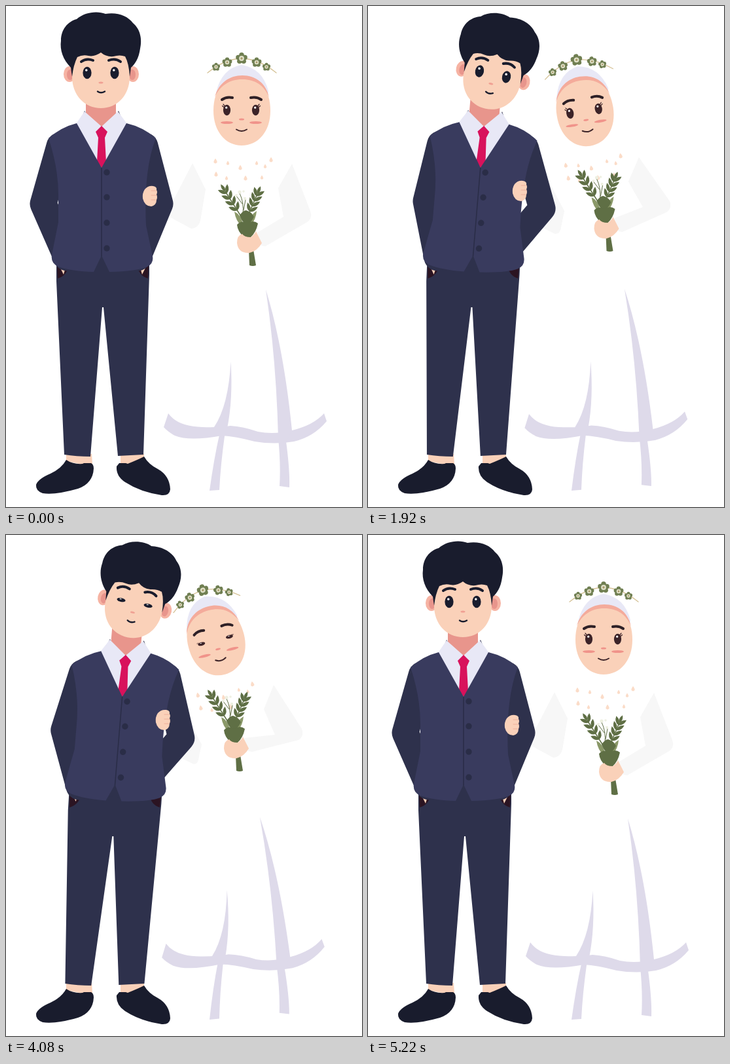
Recreate the animation shown at these times as an HTML page. Size 544 px wide and 765 px high, loop 5400 ms.

```html
<!DOCTYPE html>
<html lang="en">
<head>
<meta charset="utf-8">
<title>Wedding couple</title>
<style>
  html, body { margin: 0; width: 100%; height: 100%; overflow: hidden; background: #fff; }
  svg { display: block; width: 544px; height: 765px; }
  .ink { fill: #191c2d; }
  .suit { fill: #2e314c; }
  .vest { fill: #393b5e; }
  .skin { fill: #fad1b9; }
  .lilac { fill: #e8e8f6; }
  .fold { fill: #dedaea; }
  .sleeve { fill: #f7f7f7; }
  .rose { fill: #e8958c; }
  .green { fill: #5f6f45; }
  .sage { fill: #8a9868; }
  .line { fill: none; stroke-linecap: round; }
  .arm { fill: none; stroke: #2e314c; stroke-width: 41; stroke-linejoin: round; stroke-linecap: round; }
</style>
</head>
<body>
<svg viewBox="0 0 544 765">
  <defs>
    <path id="leaf" class="green" d="M0 0Q6 -7 0 -16Q-6 -7 0 0Z"/>
    <path id="drop" fill="#fbdcc8" d="M0 -4Q3 0 2.4 2Q0 4.5 -2.4 2Q-3 0 0 -4Z"/>
    <g id="flower">
      <g id="petals" fill="#707f52">
        <circle cy="-5" r="3.6"/><circle cx="4.8" cy="-1.5" r="3.6"/><circle cx="3" cy="4" r="3.6"/>
        <circle cx="-3" cy="4" r="3.6"/><circle cx="-4.8" cy="-1.5" r="3.6"/>
      </g>
      <circle r="3.7" fill="#dfe0c8"/><circle r="1.6" fill="#a99a6a"/>
    </g>
    <g id="groomEye">
      <ellipse class="ink" rx="6.6" ry="9.2"/><circle cx="-1.2" cy="-4" r="1.8" fill="#fff"/>
    </g>
    <g id="brideEye">
      <ellipse rx="5.6" ry="8.2" fill="#3c2328"/><circle cx="-.8" cy="-3.8" r="1.6" fill="#fff"/>
    </g>
    <path id="lash" class="line" stroke="#3c2328" stroke-width="1.2" d="M-4 -4L-7 -6.5M-3 -6L-5.5 -9"/>
  </defs>

  <g id="dress" class="fold">
    <path d="M248 622Q262 642 300 643Q325 644 343 641Q362 642 385 650Q410 655 437 648Q470 640 486 622L490 634Q470 658 440 665Q410 670 380 665Q350 657 330 656Q280 665 258 656Q247 650 241 643Z"/>
    <path d="M397 433Q424 520 437 648L428 665Q434 710 433 735L418 733Q420 700 416 660Q413 540 397 433Z"/>
    <path d="M343.500 543Q347 600 338 645L334 657Q328 700 326 739L311 740Q318 690 326 655L318 643Q340 610 343.500 543Z"/>
  </g>
  <path id="sleeveL" class="sleeve"/>
  <path id="sleeveR" class="sleeve"/>
  <g id="beads"></g>

  <g id="bouquet">
    <g id="sprigs">
      <path class="line" stroke="#5f6f45" stroke-width="1" d="M362 318Q364 300 357 286M363 312L366 296M361 302L352 290"/>
      <g fill="#eef0e2"><circle cx="357" cy="284" r="2.600"/><circle cx="365" cy="294" r="2.200"/><circle cx="352" cy="289" r="2"/><circle cx="363" cy="283" r="1.800"/></g>
    </g>
    <path class="green" d="M371 372L378 372L382 396Q377 398 372 396Z"/>
    <path class="sage" d="M349 314Q358 318 362 332L360 336Q351 328 349 314ZM383 313Q382 326 374 335L369 332Q373 319 383 313Z"/>
    <path class="green" d="M357 320Q362 312 367 312Q375 314 379 322Q374 332 367 334Q360 329 357 320Z"/>
    <path class="green" d="M353 334Q360 326 368 332Q378 326 385 332Q382 346 374 353L364 353Q354 345 353 334Z"/>
    <path class="skin" d="M353 362Q353 350 361 348Q364 353 374 353Q379 350 382 344Q387 354 391 362Q384 374 372 377Q355 378 353 362Z"/>
  </g>

  <g id="brideHead">
    <path class="lilac" d="M321 132Q330 95 360 90Q392 95 401 130L398 145L322 145Z"/>
    <path class="skin" d="M317 160C317 126 335 107 361 107C388 107 404 128 404 160C404 192 385 213 360 213C336 213 317 192 317 160Z"/>
    <path fill="#f4ab9b" d="M319 139C325 117 342 106 361 106C382 106 397 118 402 139C394 121 381 112 361 112C341 112 327 122 319 139Z"/>
    <path class="line" stroke="#d5c296" stroke-width="1.300" d="M308 102Q334 81 360 80Q387 81 413 102"/>
    <g id="crown"></g>
    <g class="line" stroke="#2e2026" stroke-width="4"><path d="M330 143Q337 138 346 140M374 140Q383 138 390 143"/></g>
    <g id="brideEyes"></g>
    <g fill="#f0938a"><ellipse cx="337.500" cy="178" rx="9.500" ry="2"/><ellipse cx="381.500" cy="178" rx="9.500" ry="2"/><ellipse cx="360" cy="173" rx="4" ry="1.500"/></g>
    <path class="line" stroke="#3c2328" stroke-width="2" d="M352 188.500Q360 193.500 368 188.500"/>
  </g>

  <path class="skin" d="M92 684H131L132 700H117L92 695ZM175 684H211V691L186 700H175Z"/>
  <path class="ink" d="M92 693Q102 700 117 699L119 698H130Q134 700 134 706Q133 729 110 737Q75 747 56 744Q45 740 46 731Q49 722 68 714Q85 706 92 693Z"/>
  <path class="ink" d="M169 703L173 698H183L186 699Q201 693 211 688Q218 700 232 707Q250 717 251 738Q250 748 238 747Q205 742 182 727Q168 718 169 703Z"/>
  <g id="legs">
    <path class="suit" d="M77 385H219V410L210 685L171 687L149 460H147L129 688Q108 688 89 685L77 420Z"/>
    <path fill="#2b1422" d="M78 396H96Q93 412 79 416ZM218 396H200Q203 412 217 416Z"/>
    <path id="handL" class="skin" d="M79 392H93L88 410Z"/>
    <path id="handR" class="skin" d="M217 392H203L208 410Z"/>
  </g>
  <path id="armL" class="arm"/>
  <path id="armR" class="arm"/>
  <g id="torso">
    <path class="suit" d="M120 160L128 172L112 180ZM172 160L164 172L180 180ZM134 400L146 375L158 400Z"/>
    <path class="rose" d="M122 144H168V166L146 186L122 166Z"/>
    <path class="lilac" d="M120 161L107 180L146 248L185 180L171 161L146 184Z"/>
    <path fill="#d8125c" d="M146 183L155 192L151 201L153 238L146 247L139 238L141 201L137 192Z"/>
    <path class="vest" d="M108 179Q84 185 65 202Q81 250 80 295V330L70 380Q68 393 80 398Q100 405 134 406L146 381L158 406Q200 405 216 398Q226 393 224 382L214 335Q210 250 229 202Q210 185 184 179L146 247Z"/>
    <path class="line" stroke="#2a2d47" stroke-width="1.500" d="M146 247V382"/>
    <g fill="#2a2d47"><circle cx="154" cy="254" r="4.700"/><circle cx="154" cy="292" r="4.700"/><circle cx="154" cy="331" r="4.700"/><circle cx="154" cy="370" r="4.700"/></g>
  </g>
  <g id="groomHead">
    <g fill="#f6b3a3"><ellipse cx="97" cy="104" rx="9" ry="12"/><ellipse cx="194" cy="104" rx="9" ry="12"/></g>
    <g class="rose"><ellipse cx="98" cy="105" rx="5" ry="8"/><ellipse cx="193" cy="105" rx="5" ry="8"/></g>
    <path class="skin" d="M101 70V108C101 136 120 156 145 156C170 156 189 136 189 108V70Z"/>
    <path class="ink" d="M101 108L99 94C87 82 82 67 84 53C84 36 94 24 108 20C120 9 140 7 152 12C170 9 186 15 194 26C206 36 208 52 205 65C203 80 197 89 191 94L189 108Q188 88 182 77Q174 74 164 77Q153 78 145 71Q135 78 126 76Q117 74 109 78Q103 90 101 108Z"/>
    <path class="line" stroke="#191c2d" stroke-width="4" d="M115 85Q123 79 133 83M157 83Q167 79 175 85"/>
    <g id="groomEyes"></g>
    <ellipse cx="145" cy="117" rx="3.500" ry="1.500" fill="#f0a093"/>
    <path class="line" stroke="#191c2d" stroke-width="2.400" d="M140 130.500Q145 134 151 130.500"/>
  </g>
  <g id="holdHand">
    <path class="skin" d="M212 280Q217 274 225 275Q231 276 230 281Q232 284 230 288Q232 292 230 296Q230 304 222 306Q212 306 209 294Q208 286 212 280Z"/>
    <path class="line" stroke="#eeb09c" stroke-width="1" d="M222 282H229M222 289H230M222 296H229"/>
  </g>
</svg>
<script>
const LOOP = 5400, STEP = 30;
const $ = id => document.getElementById(id);
const use = (id, x, y, more = '') => `<use href="#${id}" transform="translate(${x} ${y}) ${more}"/>`;

// Static details built from rules
$('crown').innerHTML = [[321, 93, .72], [338, 86, .88], [360, 80, 1.05], [383, 86, .88], [398, 93, .72]]
  .map(([x, y, s]) => use('flower', x, y, `scale(${s})`)).join('');
$('beads').innerHTML = [[320, 237], [339, 240], [358, 247], [383, 240], [405, 235], [396, 245], [321, 257], [337, 263], [366, 263], [391, 262]]
  .map(([x, y], i) => use('drop', x, y, `scale(${i % 2 ? .85 : 1.05})`)).join('');

function sprig(x0, y0, x1, y1) {
  const lean = Math.atan2(x1 - x0, y0 - y1) * 180 / Math.PI;
  let out = `<path class="line" stroke="#5f6f45" stroke-width="1.5" d="M${x0} ${y0}L${x1} ${y1}"/>`;
  for (let i = 1; i < 5; i++) {
    const k = i / 4.4, x = x0 + (x1 - x0) * k, y = y0 + (y1 - y0) * k;
    for (const side of [-36, 36]) out += use('leaf', x, y, `rotate(${lean + side}) scale(.9)`);
  }
  return out + use('leaf', x1, y1, `rotate(${lean}) scale(.8)`);
}
$('sprigs').innerHTML += sprig(359, 321, 335, 283) + sprig(369, 322, 384, 287);

// Monotone cubic through (times, values)
const BODY = [600, 870, 1530, 1920, 3030, 4050, 4380, 5190];
const HEAD = [600, 870, 1530, 1920, 2880, 4050, 4380, 5190];
function track(values, times = BODY) {
  const n = values.length;
  const d = values.slice(1).map((v, i) => (v - values[i]) / (times[i + 1] - times[i]));
  const m = values.map((_, i) => i && i < n - 1 && d[i - 1] * d[i] > 0
    ? 2 * d[i - 1] * d[i] / (d[i - 1] + d[i]) : 0);
  return t => {
    if (t <= times[0]) return values[0];
    if (t >= times[n - 1]) return values[n - 1];
    const i = times.findIndex(x => x > t) - 1, h = times[i + 1] - times[i], u = (t - times[i]) / h;
    const s = u * u * (3 - 2 * u);
    return values[i] * (1 - s) + values[i + 1] * s + h * u * (1 - u) * (m[i] * (1 - u) - m[i + 1] * u);
  };
}

const move = {
  hip: track([0, 4, 6, 13, 19, 19, 19, 0]),
  chest: track([0, 6, 17, 31, 37, 37, 23, 0]),
  headX: track([0, 8, 24, 46, 52, 52, 29, 0], HEAD),
  headY: track([0, .5, .5, 2, 1.5, 1.5, .5, 0], HEAD),
  headR: track([0, 1.4, 6.7, 12.2, 12.2, 12.2, 6.7, 0], HEAD),
  elbowLX: track([57, 45, 48.5, 57.5, 83, 89, 89, 89, 75, 68, 57], [600, 870, 1185, 1530, 1740, 1920, 3030, 4050, 4380, 4650, 5190]),
  elbowLY: track([302, 295, 295, 298, 298, 298, 300, 302]),
  elbowRX: track([235, 252, 259, 266, 268, 268, 257, 235]),
  elbowRY: track([302, 299, 303, 309, 310, 310, 304, 302]),
  handL: track([0, -14, -11, 0, -3, -3, -4, 0]),
  handR: track([0, -14, -14, -14, -14, -14, -14, 0]),
  dress: track([0, -.95, -.95, -1.7, -1.7, -1.5, 0], [1170, 1740, 2310, 2880, 4050, 4380, 5190]),
  brideX: track([0, -.7, -15, -29, -39.5, -39.5, -33, 0], HEAD),
  brideY: track([0, 0, 1, 1.5, 2, 2, 2, 0], HEAD),
  brideR: track([0, 0, -5, -9, -14.5, -14.5, -12.6, 0], HEAD),
  bustX: track([0, 0, -9.5, -17, -26, -26, -22, 0]),
  bustR: track([0, 0, -4.6, -8.4, -10.2, -10.2, -9.2, 0]),
  elbowX: track([0, 0, -4, -4, -13, -13, -12, 0]),
  elbowY: track([0, 0, -4, -15, -17, -17, -14, 0]),
  posyX: track([0, 0, -7.5, -7.5, -8, -20, -20, 0], [600, 900, 1530, 1920, 2310, 3030, 4380, 5190]),
  posyY: track([0, 0, -13, -22, -24, -36, -36, 0], [600, 900, 1530, 1920, 2310, 3030, 4380, 5190]),
  holdX: track([0, 0, 8.5, 12, 20, 20, 14, 0]),
  holdY: track([0, -1, -10, -8, -8, -8, -5, 0]),
  blink: track([0, 1, 1, 0], [2640, 2820, 4050, 4260]),
  squint: track([0, .2, 0], [5130, 5190, 5220])
};

const put = (id, value) => $(id).setAttribute('transform', value);
const poly = points => 'M' + points.map(p => p.join(' ')).join('L');
const eyes = (id, x1, x2, y, shut) => {
  const s = `scale(1 ${1 - .72 * shut})`;
  return use(id, x1, y, s) + use(id, x2, y, s);
};

function draw(t) {
  const p = {};
  for (const k in move) p[k] = move[k](t);

  // Groom
  const lean = (p.chest - p.hip) / 215, tilt = p.headR * .0038;
  const onTorso = (x, y) => [x + p.hip + (400 - y) * lean, y + (x - 147) * tilt];
  put('legs', `matrix(1 0 ${-p.hip / 308} 1 ${p.hip * 708 / 308} 0)`);
  put('torso', `matrix(1 ${tilt} ${-lean} 1 ${p.hip + 400 * lean} ${-147 * tilt})`);
  put('groomHead', `translate(${p.headX} ${p.headY}) rotate(${p.headR} 145 102)`);
  put('handL', `translate(0 ${p.handL})`);
  put('handR', `translate(0 ${p.handR})`);
  $('armL').setAttribute('d', poly([onTorso(82, 214), [p.elbowLX, p.elbowLY], [93 + p.hip, 384]]));
  $('armR').setAttribute('d', poly([onTorso(212, 214), [p.elbowRX, p.elbowRY], [201 + p.hip * .1, 384]]));
  $('groomEyes').innerHTML = eyes('groomEye', 124, 166, 102, p.blink);

  // Bride
  put('dress', `rotate(${p.dress} 312 740)`);
  put('brideHead', `translate(${p.brideX} ${p.brideY}) rotate(${p.brideR} 359 159)`);
  put('beads', `translate(${p.bustX} 0) rotate(${p.bustR} 363 245.5)`);
  put('bouquet', `translate(${p.posyX} ${p.posyY})`);
  put('holdHand', `translate(${p.holdX} ${p.holdY})`);
  const shut = Math.max(p.blink, p.squint), lid = `scale(1 ${1 - .72 * shut})`;
  $('brideEyes').innerHTML = eyes('brideEye', 337.5, 381.5, 159, shut)
    + use('lash', 337.5, 159, lid) + use('lash', 381.5, 159, `scale(-1 1) ${lid}`);

  const k = p.bustR / -10.2;
  const mix = (x, y, dx, dy) => [x + dx * k, y + dy * k];
  const elbow = (x, y) => [x + p.elbowX, y + p.elbowY];
  const wrist = (x, y) => [x + p.posyX, y + p.posyY];
  const q = (a, b) => `Q${a.join(' ')} ${b.join(' ')}`;
  $('sleeveR').setAttribute('d', poly([mix(437, 241, -28, -12), elbow(465, 313)])
    + q(elbow(469, 324), elbow(460, 330))
    + poly([wrist(396, 367), wrist(390, 366), wrist(384, 346), elbow(424, 322), mix(416, 278, -22, -12)]).replace('M', 'L') + 'Z');
  $('sleeveL').setAttribute('d', poly([mix(285, 240, -23, 10), mix(305, 280, -6, 40), mix(297, 328, -2, 10)])
    + q(mix(294, 339, 0, 11), mix(283, 340, 4, 10))
    + poly([mix(250, 322, 12, 16), mix(254, 300, 2, 10)]).replace('M', 'L') + 'Z');
}

const start = performance.now();
function tick() {
  const t = (performance.now() - start) % LOOP;
  draw(Math.floor(t / STEP) * STEP);
  requestAnimationFrame(tick);
}
tick();
</script>
</body>
</html>
```
